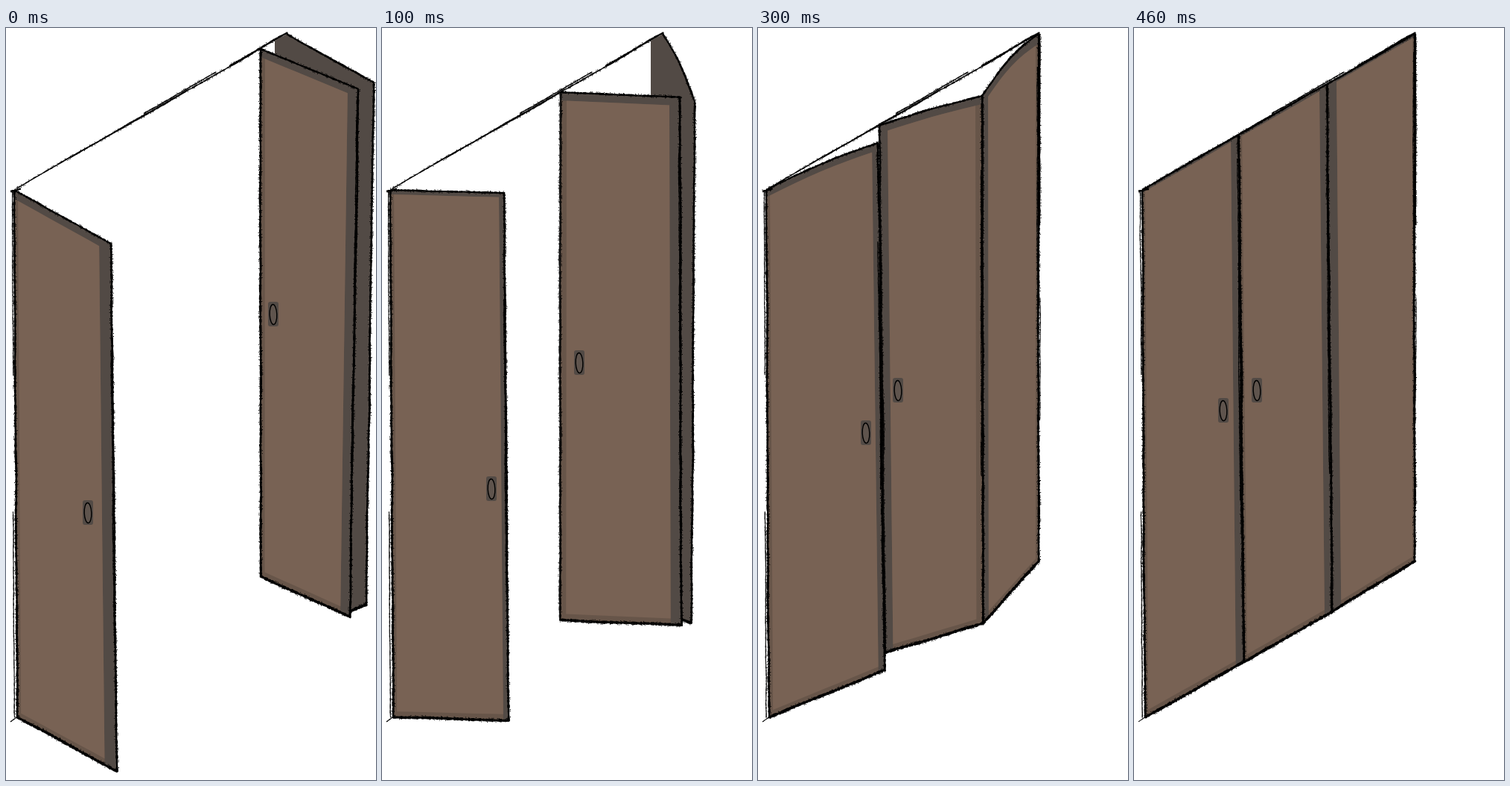
These frames come from a looping animation (497 px wide and 1008 px high, 500 ms). An HTML page with a canvas:

```html
<!DOCTYPE html>
<html lang="en">
<head>
<meta charset="utf-8">
<title>Folding doors</title>
<style>
  html, body { margin: 0; width: 100%; height: 100%; overflow: hidden; background: #fff; }
  canvas { display: block; }
</style>
</head>
<body>
<canvas id="stage" width="497" height="1008"></canvas>
<script>
const ctx = document.getElementById('stage').getContext('2d');
const WOOD = '#786254', HALF = '#675549', SHADE = '#524a45', INK = '#000';
const STEP = 100, HEIGHT = 707, FOOT = 8;

let seed = 1;
function rand() {
  seed = (seed * 16807) % 2147483647;
  return seed / 2147483647;
}

const lerp = (a, b, u) => a + (b - a) * u;

// An upright door edge: its top point and how far its foot leans sideways
const edge = (x, y, lean = 0) => ({ x, y, lean });
const HINGE_L = edge(11, 217, 4), HINGE_R = edge(377, 8);

// The rail joins both hinges; doors slide along it
function onRail(x, lean) {
  const u = (x - HINGE_L.x) / (HINGE_R.x - HINGE_L.x);
  return edge(x, lerp(HINGE_L.y, HINGE_R.y, u), lean);
}

// Point on the door between edges a and b: u across, v down
function at(a, b, u, v, bow = 0) {
  return [
    lerp(a.x + a.lean * v, b.x + b.lean * v, u),
    lerp(a.y, b.y, u) + HEIGHT * v - bow * Math.sin(Math.PI * u) * (1 - v)
  ];
}

function across(a, b, u0, u1, v, bow) {
  return Array.from({ length: 9 }, (_, i) => at(a, b, lerp(u0, u1, i / 8), v, bow));
}

function patch(color, a, b, u0, u1, v0, v1, bow) {
  ctx.beginPath();
  for (const p of across(a, b, u0, u1, v0, bow)) ctx.lineTo(...p);
  for (const p of across(a, b, u1, u0, v1, bow)) ctx.lineTo(...p);
  ctx.fillStyle = color;
  ctx.fill();
}

// Rough brush line: uneven width plus loose specks beside it
function ink(w, points) {
  ctx.fillStyle = INK;
  let drift = 0;
  for (let i = 1; i < points.length; i++) {
    const [x, y] = points[i - 1], [x2, y2] = points[i];
    const len = Math.hypot(x2 - x, y2 - y);
    ctx.save();
    ctx.translate(x, y);
    ctx.rotate(Math.atan2(y2 - y, x2 - x));
    for (let s = 0; s < len; s += 2) {
      drift = drift * 0.97 + (rand() - 0.5) * 0.3;
      const h = w * (0.7 + rand() * 0.5);
      ctx.fillRect(s, drift - h / 2, 2.3, h);
      if (w > 1.4 && rand() < 0.35) {
        const side = rand() < 0.5 ? -1 : 1;
        ctx.fillRect(s, drift + side * (w / 2 + 0.8) - 0.5, 1, 1);
      }
    }
    ctx.restore();
  }
}

const inkEdge = (w, e, from = 0, to = 1, dx = 0) =>
  ink(w, [from, to].map(v => [e.x + e.lean * v + dx, e.y + HEIGHT * v]));

const inkRail = (w, from, to, dy = 0) =>
  ink(w, [from, to].map(x => [x, onRail(x).y + dy]));

// The wider side bevel lies in shade, the narrower one in half-tone
function door(a, b, { l, r, top, bow = 0 }) {
  const w = b.x - a.x, u0 = l / w, u1 = 1 - r / w;
  const v0 = top / HEIGHT, v1 = 1 - FOOT / HEIGHT;
  patch(HALF, a, b, 0, 1, 0, 1, bow);
  patch(SHADE, a, b, 0, 1, 0, v0, bow);
  if (l > r) patch(SHADE, a, b, 0, u0, 0, 1, bow);
  else patch(SHADE, a, b, u1, 1, 0, 1, bow);
  patch(WOOD, a, b, u0, u1, v0, v1, bow);
  ink(2.6, across(a, b, 0, 1, 0, bow));
  inkEdge(3, a);
  inkEdge(3, b);
  ink(3.8, across(a, b, 0, 1, 1, bow));
  inkEdge(1.2, b, rand() * 0.3, 0.5 + rand() * 0.3, -1.5);
}

function knob([x, y]) {
  ctx.fillStyle = SHADE;
  ctx.beginPath();
  ctx.roundRect(x - 7, y - 17, 14, 33, 3);
  ctx.fill();
  ctx.beginPath();
  ctx.ellipse(x, y, 4.8, 13.5, -0.04, 0, Math.PI * 2);
  ctx.fillStyle = '#5f544d';
  ctx.fill();
  ctx.strokeStyle = INK;
  ctx.lineWidth = 1.4;
  ctx.stroke();
}

function rail() {
  inkRail(1.7, 14, 255);
  inkRail(1.4, 70, 245, -1);
  inkRail(1.6, 185, 282, -3);
  inkRail(1.8, 250, 326);
  inkRail(2.8, 300, 378, -1);
}

// Back of the folded door, seen past the fold
function backSide(fold, { far, bow }) {
  const near = onRail(361);
  patch(SHADE, near, HINGE_R, 0, 1, 0, 0.9);
  patch(SHADE, HINGE_R, far, 0, 1, 0, 0.98, bow);
  patch(SHADE, fold, far, 0, 1, 0, 0.99);
  ink(2.6, across(HINGE_R, far, 0, 1, 0, bow));
  inkEdge(2.8, far, 0, 0.99);
  ink(4, across(fold, far, 0, 1, 0.99));
}

// free: swinging edge of the left door; slide and fold: edges of the middle door
const poses = [
  {
    free: edge(141, 289, 8), slide: onRail(342, 0), fold: edge(473, 82, -11),
    back: { far: edge(494, 73, -10), bow: 0 },
    left: { l: 5, r: 16, top: 12 }, mid: { l: 6, r: 14, top: 11 },
    knobs: [[110, 650], [359, 384]]
  },
  {
    free: edge(164, 221, 6), slide: onRail(240, -1), fold: edge(400, 93, 2),
    back: { far: edge(420, 98, -4), bow: 9 },
    left: { l: 5, r: 7, top: 6 }, mid: { l: 8, r: 14, top: 11 },
    knobs: [[147, 618], [265, 449]]
  },
  {
    free: edge(180, 166, 5), slide: onRail(185, 3), fold: edge(327, 94, 8),
    left: { l: 4, r: 7, top: 9, bow: 6 }, mid: { l: 13, r: 11, top: 10, bow: 4 },
    right: { l: 12, r: 6, top: 22 },
    knobs: [[169, 575], [222, 484]], stray: edge(392, 235)
  },
  {
    free: edge(161, 154, 9), slide: onRail(163, 8), fold: edge(301, 91, 1),
    left: { l: 5, r: 8, top: 10, bow: 4 }, mid: { l: 11, r: 9, top: 11, bow: 2 },
    right: { l: 8, r: 4, top: 13, bow: 10 },
    knobs: [[145, 543], [188, 486]]
  },
  {
    free: onRail(140, 7), slide: onRail(141, 7), fold: onRail(259, 7),
    left: { l: 4, r: 10, top: 4 }, mid: { l: 4, r: 10, top: 4 },
    right: { l: 13, r: 3, top: 4 },
    knobs: [[120, 513], [165, 486]]
  }
];

function draw(pose) {
  seed = 4211;
  ctx.fillStyle = '#fff';
  ctx.fillRect(0, 0, 497, 1008);
  rail();
  if (pose.back) backSide(pose.fold, pose.back);
  if (pose.right) {
    door(pose.fold, HINGE_R, pose.right);
    inkEdge(1.6, HINGE_R, 0, 0.36, 1.5);
    inkEdge(1, HINGE_R, 0.5, 0.73, 2);
  }
  if (pose.stray) inkEdge(1, pose.stray, 0, 0.14);
  door(pose.slide, pose.fold, pose.mid);
  door(HINGE_L, pose.free, pose.left);
  inkEdge(1.2, HINGE_L, 0, 0.35, -2.5);
  inkEdge(1.4, HINGE_L, 0.61, 1, -4);
  ink(2.6, [[6, 219], [18, 216]]);
  ink(1.2, [[6, 930], [16, 923]]);
  pose.knobs.forEach(knob);
}

let shown = -1;
function tick() {
  const n = Math.floor(performance.now() / STEP) % poses.length;
  if (n !== shown) draw(poses[shown = n]);
  requestAnimationFrame(tick);
}
tick();
</script>
</body>
</html>
```
